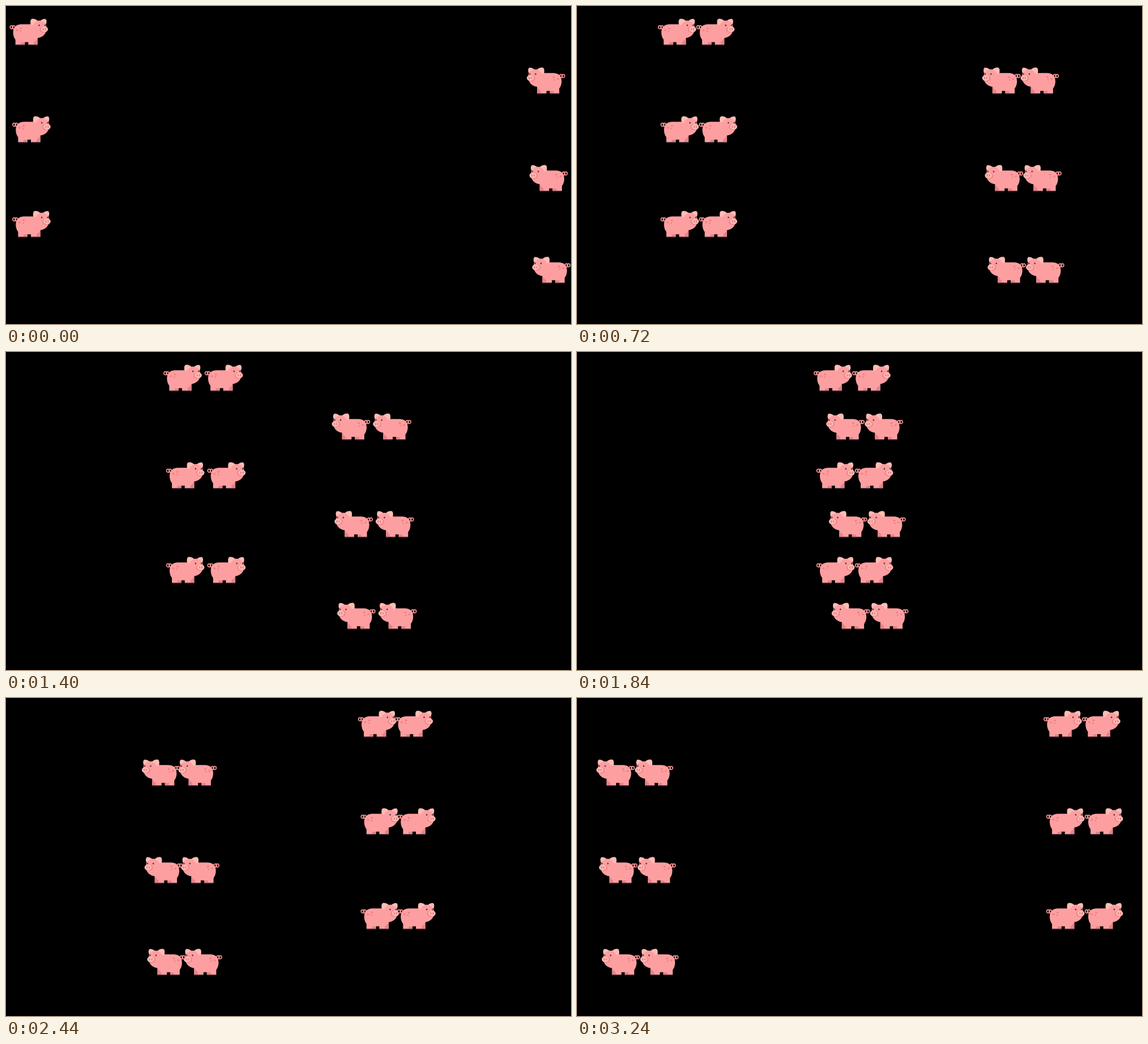
These frames come from a looping animation (998x561 px, 3.28 s). An HTML page with a canvas:

```html
<!DOCTYPE html>
<html lang="en">
<head>
<meta charset="utf-8">
<title>Walking pigs</title>
<style>
html, body { margin: 0; width: 100%; height: 100%; overflow: hidden; background: #000; }
canvas { display: block; }
</style>
</head>
<body>
<canvas id="stage" width="998" height="561"></canvas>
<script>
const ctx = document.getElementById('stage').getContext('2d');
const LOOP = 3280, TICK = 40;
const PIG_W = 68;

// Places where a pig stops on its way across
const stops = [6.3, 74.5, 142.7, 210.5, 278, 350.7, 418, 486, 554, 621.7, 686.3, 756.7, 824, 892];
const STEP = LOOP / stops.length;

const rows = [
  { y: 22, shift: 0 },
  { y: 108, shift: 0, left: true },
  { y: 194, shift: 4.7 },
  { y: 280, shift: 4.7, left: true },
  { y: 361, shift: 4.7 },
  { y: 442, shift: 9.5, left: true }
];

const body = new Path2D('M10.4 46.2V37.5Q6.3 32 6.3 25C6.3 15 12 10.2 21 10.2H38C42 6 45 3.8 50 3.8H56C61 4 64.5 9 65 15C66.5 26 59 33.5 49.7 34.5V46.2H33V41.8H27V46.2Z');
const shade = new Path2D('M20 42H27V46.2H20ZM43 46.2V42Q47 39 49.7 34.5V46.2Z');
const ears = new Path2D('M37.3 11C36.3 5 37 1.3 40 .6C44 .3 47.5 2 49.5 4.5C46 5.5 43 8 41.5 11.5ZM54.5 4C57.5 1.2 60.5 .4 63 .7C65.8 2 66 6 64.3 10.5C62 7.5 58.5 5 54.5 4Z');
const feet = new Path2D('M10.4 46.2H27V48.3H10.4ZM33 46.2H49.7V48.3H33Z');

function fill(path, color) {
  ctx.fillStyle = color;
  ctx.fill(path);
}

function oval(x, y, rx, ry, color) {
  ctx.beginPath();
  ctx.ellipse(x, y, rx, ry, 0, 0, Math.PI * 2);
  ctx.fillStyle = color;
  ctx.fill();
}

function ring(x, y, rx, ry) {
  ctx.beginPath();
  ctx.ellipse(x, y, rx, ry, 0, 0, Math.PI * 2);
  ctx.stroke();
}

function drawPig(x, y, left) {
  ctx.save();
  ctx.translate(left ? x + PIG_W : x, y);
  if (left) ctx.scale(-1, 1);

  ctx.strokeStyle = '#ee8f8e';
  ctx.lineWidth = 1.8;
  ring(3.5, 15.5, 2.6, 2.8);
  ring(7.4, 15.5, 2.3, 2.8);
  fill(body, '#fd9fa1');
  fill(shade, '#e58387');
  fill(feet, '#241e2a');
  fill(ears, '#ffbcb4');

  oval(13, 20.8, 2, 1.8, '#ee8084');
  oval(20.3, 17.5, 2, 1.7, '#ee8084');
  oval(19.2, 22.3, 1.4, 1.3, '#ee8084');

  oval(52.2, 12, 1.3, 1.5, '#4d3548');
  oval(62.6, 12, 1.2, 1.5, '#4d3548');
  oval(60, 19.5, 7, 5.8, '#ec878b');
  oval(61.5, 19, 6.3, 5, '#ffbab3');
  oval(59.5, 19, 1.2, 2.2, '#e58387');
  oval(63.4, 19, 1.2, 2.2, '#e58387');
  ctx.restore();
}

// Each pig stays for two steps; the first one waits a step longer
function visible(i, step) {
  const stay = i === 0 ? 3 : 2;
  return step >= i && step < i + stay;
}

function draw(time) {
  const t = Math.floor((time % LOOP) / TICK) * TICK;
  const step = Math.floor(t / STEP);
  ctx.fillStyle = '#000';
  ctx.fillRect(0, 0, 998, 561);
  for (const { y, shift, left } of rows) {
    stops.forEach((x, i) => {
      if (visible(i, step)) drawPig((left ? 926 - x : x) + shift, y, left);
    });
  }
}

const start = performance.now();
function loop(now) {
  draw(Math.max(0, now - start));
  requestAnimationFrame(loop);
}
draw(0);
requestAnimationFrame(loop);
</script>
</body>
</html>
```
